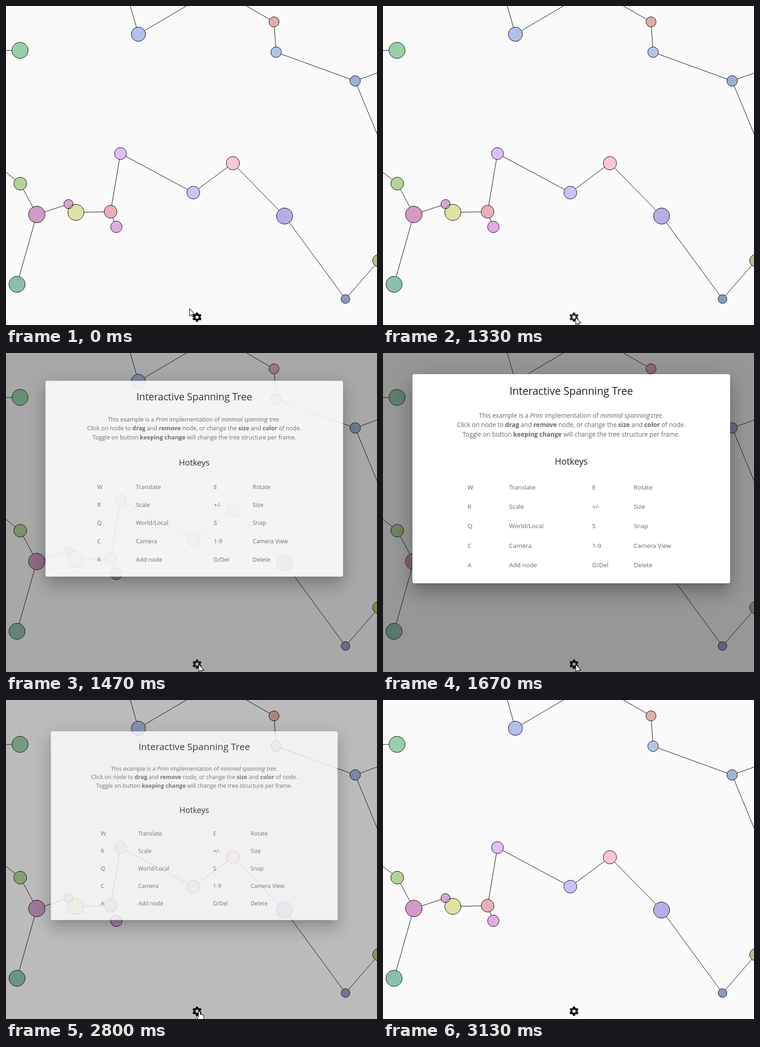
An HTML page with a canvas that plays this animation: 807 px wide and 694 px high, repeating every 3.94 s.

```html
<!DOCTYPE html>
<html lang="en">
<head>
<meta charset="utf-8">
<title>Interactive Spanning Tree</title>
<style>
  html, body { margin: 0; width: 100%; height: 100%; overflow: hidden; background: #fafafa; }
  canvas { position: absolute; left: 0; top: 0; display: block; }
  #dialog {
    position: absolute; left: 64px; top: 46px; width: 691px; height: 455px;
    background: #fff; border-radius: 4px; opacity: 0;
    font-family: "Open Sans", "Noto Sans", sans-serif; color: rgba(0, 0, 0, .6);
    box-shadow: 0 11px 15px -7px rgba(0, 0, 0, .2), 0 24px 38px 3px rgba(0, 0, 0, .14),
      0 9px 46px 8px rgba(0, 0, 0, .12);
  }
  #dialog div { position: absolute; line-height: 0; white-space: nowrap; }
  #dialog .center { left: 50%; transform: translateX(-50%); }
  #dialog .heading { color: rgba(0, 0, 0, .87); }
</style>
</head>
<body>
<canvas id="stage" width="807" height="694"></canvas>
<div id="dialog"></div>
<script>
const W = 807, H = 694, LOOP = 3940, FRAME = 1000 / 15;
const ctx = document.getElementById('stage').getContext('2d');
const dialog = document.getElementById('dialog');

// x, y, radius, colour; nodes beyond the stage only carry edges.
const nodes = [
  [30.5, 96.5, 17.5, '#97cfa9'], [288, 61.5, 15.5, '#b1bfeb'], [583, 34.5, 11, '#e3aca9'],
  [587.5, 100.5, 11.5, '#b0c5ec'], [759.5, 163, 11.5, '#9fb0d8'], [249, 321, 13, '#dcbff8'],
  [407.5, 406, 14, '#cac4fc'], [493.5, 342, 14.5, '#fec5d3'], [606, 457, 17.5, '#b5ade6'],
  [738.5, 637.5, 9.5, '#8d99c3'], [811, 554, 13.5, '#b0c686'], [31, 386.5, 14, '#b3d394'],
  [67, 453.5, 18, '#d29ac5'], [136, 431, 10, '#dba5d5'], [152, 449, 17.5, '#dde2a4'],
  [227.5, 447.5, 14, '#ebaeb9'], [240, 480.5, 12.5, '#e4abe3'], [24, 605.5, 17.5, '#8bc0ae'],
  [252, -64], [457, -38], [840, 134], [835, 346], [-20, 97], [-15, 350]
];

// Prim: keep adding the nearest outside node to the tree.
function spanningTree([first, ...rest]) {
  const tree = [first], edges = [];
  while (rest.length) {
    let best = { length: Infinity };
    for (const a of tree) {
      for (const b of rest) {
        const length = Math.hypot(a[0] - b[0], a[1] - b[1]);
        if (length < best.length) best = { length, a, b };
      }
    }
    edges.push([best.a, best.b]);
    tree.push(best.b);
    rest.splice(rest.indexOf(best.b), 1);
  }
  return edges;
}
const edges = spanningTree(nodes);
const visible = nodes.filter(node => node.length > 2);

function addText(html, x, baseline, size, className = '') {
  const el = document.createElement('div');
  el.innerHTML = html;
  el.className = className;
  if (x !== null) el.style.left = x + 'px';
  el.style.top = baseline - .388 * size + 'px';
  el.style.fontSize = size + 'px';
  dialog.append(el);
}

function buildDialog() {
  addText('Interactive Spanning Tree', null, 46, 22.8, 'center heading');
  [
    'This example is a <i>Prim</i> implementation of <i>minimal spanning tree</i>.',
    'Click on node to <b>drag</b> and <b>remove</b> node, or change the <b>size</b> and <b>color</b> of node.',
    'Toggle on button <b>keeping change</b> will change the tree structure per frame.'
  ].forEach((line, i) => addText(line, null, 95.5 + 20.2 * i, 13.55, 'center'));
  addText('Hotkeys', null, 197, 19.2, 'center heading');
  [
    'W Translate E Rotate',
    'R Scale +/- Size',
    'Q World/Local S Snap',
    'C Camera 1-9 Camera_View',
    'A Add_node D/Del Delete'
  ].forEach((row, r) => row.split(' ').forEach((cell, c) => {
    const column = c < 2 ? c : c + 1;
    addText(cell.replace('_', ' '), 120 + 90.3 * column, 251 + 42.3 * r, 13.5);
  }));
}

const clamp = v => Math.min(1, Math.max(0, v));

// CSS-like cubic Bézier easing, solved by bisection.
function bezier(x1, y1, x2, y2) {
  const at = (a, b, s) => 3 * (1 - s) * (1 - s) * s * a + 3 * (1 - s) * s * s * b + s * s * s;
  return x => {
    if (x <= 0 || x >= 1) return clamp(x);
    let lo = 0, hi = 1;
    for (let i = 0; i < 24; i++) {
      const mid = (lo + hi) / 2;
      if (at(x1, x2, mid) < x) lo = mid; else hi = mid;
    }
    return at(y1, y2, lo);
  };
}
const swift = bezier(.25, .8, .25, 1);
const swing = bezier(.25, .8, .5, 1);

const between = (t, ease, open, close) => ease((t - open) / 300) - ease((t - close) / 300);

function circle(x, y, r) {
  ctx.beginPath();
  ctx.arc(x, y, r, 0, 2 * Math.PI);
}

function drawGraph() {
  ctx.strokeStyle = '#000';
  ctx.lineWidth = 1;
  for (const [a, b] of edges) {
    ctx.beginPath();
    ctx.moveTo(a[0], a[1]);
    ctx.lineTo(b[0], b[1]);
    ctx.stroke();
  }
  for (const [x, y, r, color] of visible) {
    circle(x, y, r);
    ctx.fillStyle = color;
    ctx.fill();
  }
  for (const [x, y, r] of visible) {
    circle(x, y, r);
    ctx.stroke();
  }
}

function drawGear(light) {
  const v = Math.round(51 * light);
  ctx.save();
  ctx.translate(415.5, 677);
  ctx.fillStyle = `rgb(${v},${v},${v})`;
  circle(0, 0, 7.4);
  ctx.arc(0, 0, 3.5, 0, 2 * Math.PI, true);
  ctx.fill();
  for (let i = 0; i < 6; i++) {
    ctx.beginPath();
    ctx.moveTo(-3.1, -6);
    ctx.lineTo(-2.2, -10);
    ctx.lineTo(2.2, -10);
    ctx.lineTo(3.1, -6);
    ctx.fill();
    ctx.rotate(Math.PI / 3);
  }
  ctx.restore();
}

const arrow = { path: new Path2D('M1.5 3.5V14L4.5 11.5H9ZM4.5 11.5L7 17'), width: 1.3 };
const hand = { path: new Path2D('M-3.5 11.5L2 18H8'), width: 2.6 };
for (let i = 0; i < 4; i++) {
  hand.path.moveTo(1 + 2.6 * i, i ? 7.5 + .6 * i : 2);
  hand.path.lineTo(1 + 2.6 * i, 17);
}

// White shape with a one pixel black rim.
function drawCursor({ path, width }, x, y) {
  ctx.save();
  ctx.translate(x, y);
  ctx.lineCap = 'round';
  for (const [color, rim] of [['#000', 2], ['#fff', 0]]) {
    ctx.fillStyle = ctx.strokeStyle = color;
    ctx.lineWidth = width + rim;
    ctx.stroke(path);
    ctx.fill(path);
  }
  ctx.restore();
}

function render(time) {
  const t = Math.floor((time % LOOP + 3.5) / FRAME) * FRAME;

  ctx.fillStyle = '#fafafa';
  ctx.fillRect(0, 0, W, H);
  drawGraph();
  const hover = clamp((t - 930) / 130);
  drawGear(hover * (1 - clamp((t - 1340) / 300)));

  ctx.fillStyle = `rgba(33,33,33,${.46 * between(t, swing, 1338, 2760)})`;
  ctx.fillRect(0, 0, W, H);

  if (t < 2660) {
    const u = clamp(t / 530), p = u * u * (3 - 2 * u);
    drawCursor(arrow, Math.round(399 + 20 * p), Math.round(658 + 19 * p));
  } else if (t < 3130) {
    drawCursor(hand, 419.5, 677.5);
  }

  const shown = between(t, swift, 1350, 2782);
  dialog.style.opacity = shown;
  dialog.style.transform = `scale(${.5 + .5 * shown})`;
}

buildDialog();
const start = performance.now();
function tick() {
  render(performance.now() - start);
  requestAnimationFrame(tick);
}
tick();
</script>
</body>
</html>
```
